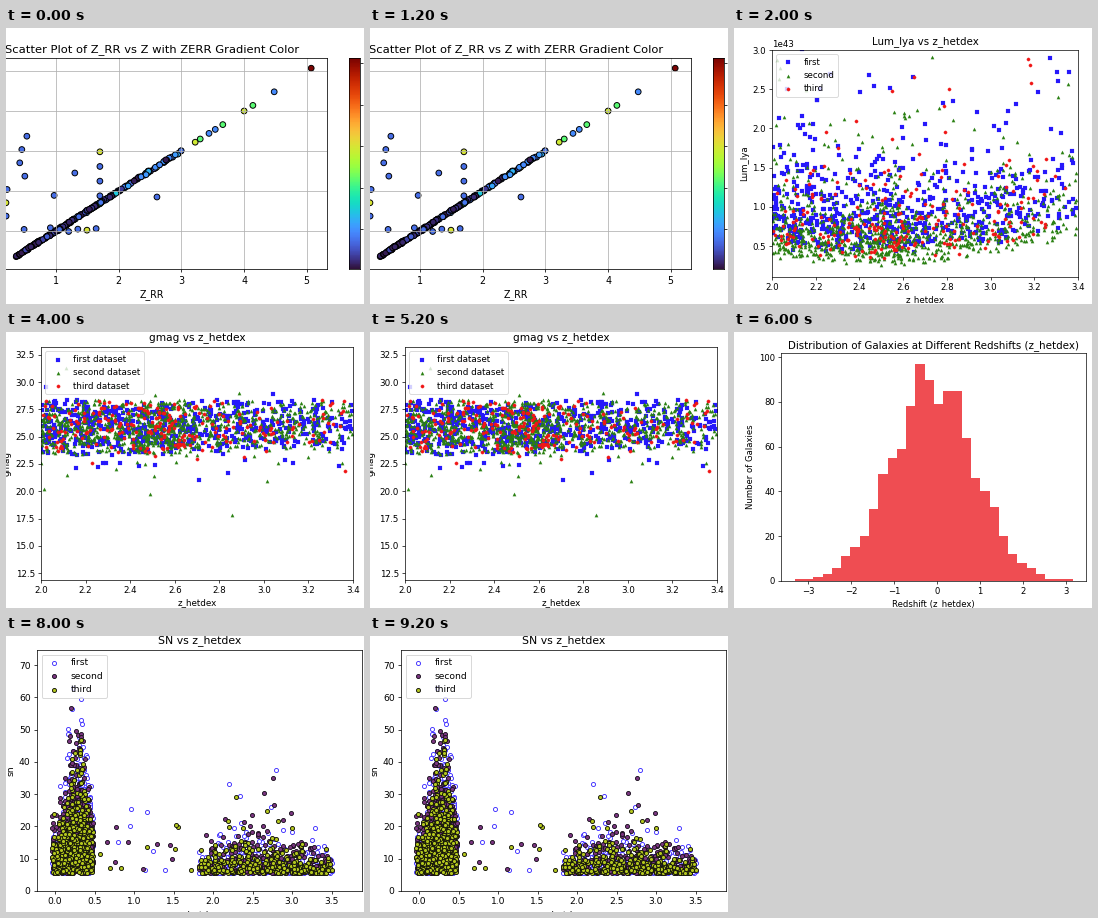
These frames come from a looping animation (358x276 px, 10000 ms). A matplotlib script:

```python
import numpy as np
import matplotlib.pyplot as plt
from matplotlib.animation import FuncAnimation

W, H, DPI = 358, 276, 64
BLUE, GREEN, RED = "#2618fb", "#2a8012", "#f01616"

plt.rcParams["font.family"] = "DejaVu Sans"
fig = plt.figure(figsize=(W / DPI, H / DPI), dpi=DPI, facecolor="white")
rng = np.random.default_rng(11)


def place(left, top, right, bottom):
    """Axes from a pixel box measured from the top left corner."""
    return fig.add_axes([left / W, 1 - bottom / H,
                         (right - left) / W, (bottom - top) / H])


def ticks(lim, step):
    first, last = np.ceil(lim[0] / step - 1e-6), lim[1] / step + 1e-6
    return np.arange(first, last) * step


def panel(box, scale, xlim, ylim, xstep, ystep, title, xlabel, ylabel, pad=6):
    """Axes in the default matplotlib look, shrunk by scale."""
    s = scale * 100 / DPI
    ax = place(*box)
    ax.set_xticks(ticks(xlim, xstep))
    ax.set_yticks(ticks(ylim, ystep))
    ax.set_xlim(xlim)
    ax.set_ylim(ylim)
    ax.tick_params(length=3.5 * s, pad=3.5 * s, width=0.8 * s, labelsize=10 * s)
    ax.yaxis.get_offset_text().set_size(10 * s)
    ax.spines[:].set_linewidth(0.8 * s)
    ax.set_title(title, fontsize=12 * s, pad=pad * s)
    ax.set_xlabel(xlabel, fontsize=10 * s, labelpad=4 * s)
    ax.set_ylabel(ylabel, fontsize=10 * s, labelpad=4 * s)
    return ax, s


def add_legend(ax, s):
    frame = ax.legend(loc="upper left", fontsize=10 * s).get_frame()
    frame.set_linewidth(s)


def rarely(n, chance):
    return rng.random(n) < chance


def gradient_scatter():
    ax, s = panel((-29, 30, 321, 241), 0.6875, (-0.26, 5.322), (0.05, 5.325),
                  1, 1, "Scatter Plot of Z_RR vs Z with ZERR Gradient Color",
                  "Z_RR", "Z")
    ax.grid(True, linewidth=0.8 * s)

    line = np.append(rng.uniform(0.32, 3, 150), rng.uniform(0.5, 1.9, 90))
    line_err = np.minimum(0.01 + rng.exponential(0.01 + 0.035 * line ** 1.5), 0.6)

    tail = np.array([3.22, 3.30, 3.44, 3.54, 3.66, 4.0, 4.14, 4.48, 5.07])
    tail_err = 0.35 + 0.22 * np.cos(0.4 * np.pi * np.arange(tail.size))
    tail_err[-1] = 1

    # column at the left, row at the bottom, stack in the middle, strays
    x = np.concatenate([rng.uniform(0.2, 0.55, 8), np.linspace(0.91, 1.64, 6),
                        np.full(4, 1.7), [0.97, 1.30, 2.61]])
    y = np.concatenate([np.linspace(1.04, 3.37, 8), rng.normal(1.05, 0.03, 6),
                        np.linspace(1.88, 2.98, 4), [1.89, 2.45, 1.85]])
    err = 0.13 + 0.45 * rarely(x.size, 0.2)

    ax.scatter(np.concatenate([line, tail, x]),
               np.concatenate([line + rng.normal(0, 0.012, line.size), tail, y]),
               c=np.concatenate([line_err, tail_err, err]),
               cmap="turbo", vmin=0, vmax=1,
               s=36 * s * s, edgecolors="black", linewidths=s)

    bar = place(343, 30, 354, 241)
    bar.imshow(np.linspace(0, 1, 256)[:, None], cmap="turbo", origin="lower",
               aspect="auto", extent=(0, 1, 0, 211))
    bar.yaxis.tick_right()
    bar.set_xticks([])
    bar.set_yticks(40 + 41.5 * np.arange(5), [""] * 5)
    bar.tick_params(length=3.5 * s, width=0.8 * s)
    bar.spines[:].set_linewidth(0.8 * s)
    return [ax, bar]


def redshifts(n, clump):
    """Spread over 2.0 to 3.4, thinning out, with a clump near 2.55."""
    k = int(n * clump)
    wide = 2 + 1.4 * rng.beta(0.95, 1.3, n - k)
    return np.append(wide, rng.normal(2.54, 0.07, k))


def three_sets(ax, s, values, suffix=""):
    """Scatter three sets; values(z, i) gives the heights of set i."""
    styles = [("first", 620, 0.04, BLUE, "s"),
              ("second", 950, 0.14, GREEN, "^"),
              ("third", 230, 0.15, RED, "o")]
    for i, (name, n, clump, color, marker) in enumerate(styles):
        z = redshifts(n, clump)
        ax.scatter(z, values(z, i), s=15 * s * s, c=color, marker=marker,
                   linewidths=0.2, label=name + suffix)
    add_legend(ax, s)


def luminosity():
    ax, s = panel((38, 22, 344, 249), 0.617, (2, 3.4), (0.105e43, 3e43),
                  0.2, 0.5e43, "Lum_lya vs z_hetdex", "z_hetdex", "Lum_lya",
                  pad=7)

    def values(z, i):
        low = (0.38, 0.24, 0.30)[i] + 0.45 * (z - 2.45) ** 2
        excess = rng.gamma(2.2, (0.24, 0.18, 0.21)[i], z.size)
        return (low + excess * np.where(rarely(z.size, 0.13), 2.6, 1)) * 1e43

    three_sets(ax, s, values)
    return [ax]


def magnitude():
    ax, s = panel((35, 15, 347, 248), 0.629, (2, 3.4), (11.86, 33.23),
                  0.2, 2.5, "gmag vs z_hetdex", "z_hetdex", "gmag", pad=7.6)

    def values(z, i):
        low = 23.1 + 0.5 * (z - 2)
        band = low + (28.4 - low) * rng.beta(1.7, 1.6, z.size)
        stray = rng.laplace(-1.2, (1.4, 1.1, 0.8)[i], z.size)
        return band + stray * rarely(z.size, 0.1)

    three_sets(ax, s, values, " dataset")
    return [ax]


def histogram():
    ax, _ = panel((47, 21, 352, 249), 0.615, (-3.628, 3.465), (0, 101.85),
                  1, 20,
                  "Distribution of Galaxies at Different Redshifts (z_hetdex)",
                  "Redshift (z_hetdex)", "Number of Galaxies")
    edges = np.linspace(-3.306, 3.162, 31)
    mid = (edges[:-1] + edges[1:]) / 2
    bell = 90.5 * np.exp(-((mid + 0.1) / 0.95) ** 2 / 2)
    ripple = 1 + 0.12 * np.cos(np.pi / 2 * (np.arange(30) - 13))
    counts = np.maximum(np.round(bell * ripple), 1)
    ax.stairs(counts, edges, fill=True, color="#ef4d52")
    return [ax]


def signal_noise():
    ax, s = panel((31, 14, 356, 255), 0.655, (-0.228, 3.886), (0, 74.65),
                  0.5, 10, "SN vs z_hetdex", "z_hetdex", "sn", pad=7.6)
    styles = [("first", 450, 1.1, "white", "#4030ff"),
              ("second", 600, 1.0, "#7a3580", "#1c1220"),
              ("third", 480, 0.85, "#b4c81e", "#14140a")]
    for name, n, spread, face, edge in styles:
        near = -0.04 + 0.52 * rng.beta(1.4, 1.15, n)
        far = 1.82 + 1.7 * rng.beta(1.2, 1.3, 340)
        stray = rng.uniform(0.55, 1.85, 8)
        z = np.concatenate([near, far, stray])
        height = np.concatenate([
            np.abs(rng.normal(0, 6 + 13 * np.exp(-((near - 0.28) / 0.17) ** 2))),
            rng.exponential(1.6 + 3.2 * np.exp(-((far - 2.5) / 0.55) ** 2)),
            rng.exponential(8, stray.size)])
        ax.scatter(z, 5.5 + spread * height, s=20 * s * s, c=face,
                   edgecolors=edge, linewidths=s, label=name)
    add_legend(ax, s)
    return [ax]


scenes = [gradient_scatter(), luminosity(), magnitude(), histogram(),
          signal_noise()]


def show(i):
    for j, scene in enumerate(scenes):
        for ax in scene:
            ax.set_visible(j == i)
    return []


anim = FuncAnimation(fig, show, frames=len(scenes), interval=2000,
                     init_func=lambda: show(0), repeat=True, repeat_delay=0,
                     blit=False)
plt.show()
```
